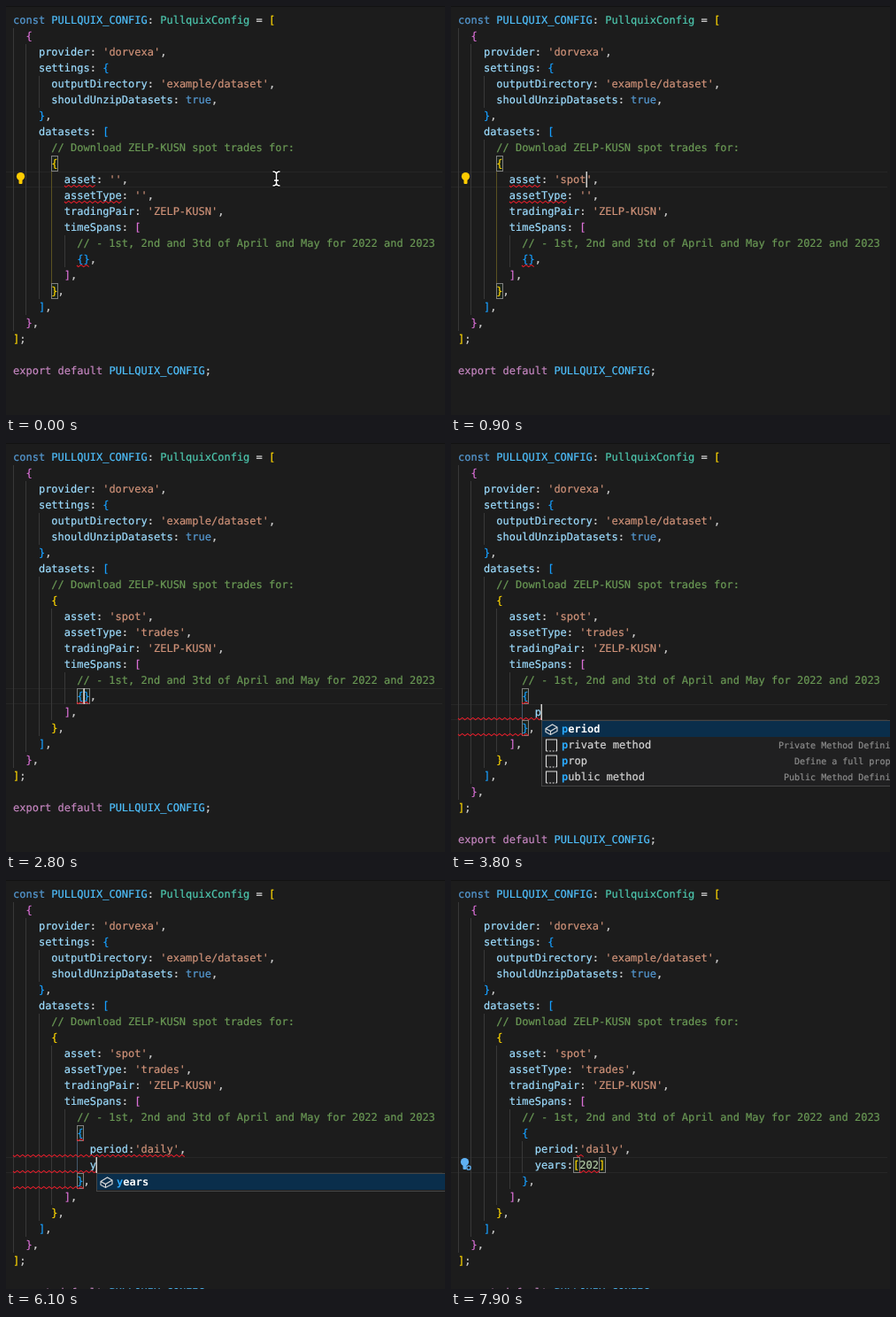
An HTML page that plays this animation: 496x462 px, repeating every 8000 ms.

```html
<!DOCTYPE html>
<html lang="en">
<head>
<meta charset="utf-8">
<title>Editor typing</title>
<style>
  html, body { margin: 0; width: 100%; height: 100%; overflow: hidden; background: #1c1c1c; }
  svg { display: block; }
  text {
    font: 12px "DejaVu Sans Mono", monospace;
    white-space: pre;
    text-rendering: geometricPrecision;
    color: #d4d4d4;
  }
  text, tspan { fill: currentColor; stroke: currentColor; stroke-width: .2px; }
  .hint { font-size: 10px; color: #8c8c8c; }
  .chosen { font-weight: bold; color: #fff; }
  .chosen, .match { stroke: none; }
  .match { font-weight: bold; color: #2aaaff; }
  .icon { fill: none; stroke: #dcdcdc; stroke-width: 1.1; }
</style>
</head>
<body>
<svg id="stage" width="496" height="462" viewBox="0 0 496 462"></svg>
<script>
const LOOP = 8000, CHAR = 7.2246, LINE = 18, LEFT = 8, TOP = 7;
const BRACKETS = ['#ffd700', '#da70d6', '#179fff'];
const colX = c => LEFT + c * CHAR;
const rowY = r => TOP + r * LINE;

const snippets = [
  ['#endregion'], ['#region'],
  ['async arrow function', 'Async Function Expression'],
  ['async function', 'Async Function Statement'],
  ['class', 'Class Definition'], ['ctor'],
  ['dowhile', 'Do-While Statement'],
  ['error', 'Log error to console'], ['for']
].map(([label, hint]) => ({ icon: 'snippet', label, hint }));
const values = (...labels) => labels.map(label => ({ icon: 'value', label }));

const menus = {
  asset: [...values('coin-m', 'spot', 'usd-m'), ...snippets],
  type: [...values('aggTrades', 'klines', 'trades'), ...snippets],
  fields: [
    { icon: 'field', label: 'period', match: 1 },
    { icon: 'snippet', label: 'private method', match: 1, hint: 'Private Method Definition' },
    { icon: 'snippet', label: 'prop', match: 1, hint: 'Define a full property' },
    { icon: 'snippet', label: 'public method', match: 1, hint: 'Public Method Definition' }
  ],
  period: values('daily', 'monthly'),
  years: [{ icon: 'field', label: 'years', match: 1 }]
};

// Each step changes part of the state; "at" moves the caret and restarts its blink.
const daily = "period:'daily',";
const empty = [15, 10, 12], noType = [11, 8, 17];
const steps = [
  [0, { asset: '', type: '', body: null, at: null, menu: null, sel: 0, line: 10, bulb: 'warm',
        mouse: true, wide: false, errs: [[10, 8, 13], noType, empty], pair: [9, 6, 17, 6] }],
  [200, { at: [10, 16] }],
  [300, { menu: 'asset', mouse: false }],
  [600, { sel: 1 }],
  [800, { asset: 'spot', menu: null, at: [10, 20] }],
  [1100, { errs: [noType, empty] }],
  [1400, { at: [11, 20], line: 11 }],
  [1500, { menu: 'type', sel: 0 }],
  [1600, { sel: 1 }],
  [1700, { sel: 2 }],
  [2100, { type: 'trades', menu: null, sel: 0, at: [11, 26] }],
  [2300, { errs: [empty] }],
  [2800, { at: [15, 11], line: 15, bulb: null, pair: [15, 10, 15, 11] }],
  [3000, { body: [''], at: [16, 12], line: 16, errs: [], wide: true, pair: [15, 10, 17, 10] }],
  [3700, { body: ['p'], at: [16, 13], menu: 'fields' }],
  [4000, { body: ['period'], at: [16, 18], menu: null }],
  [4200, { body: ['period:'], at: [16, 19] }],
  [4400, { body: ["period:''"], at: [16, 20] }],
  [4500, { menu: 'period' }],
  [4600, { bulb: 'cool', wide: false, errs: [[16, 12, 18], [16, 19, 21], [17, 10, 11]] }],
  [5200, { body: ["period:'daily'"], at: [16, 25], menu: null }],
  [5400, { at: [16, 26], bulb: null, errs: [], wide: true }],
  [5600, { body: [daily], at: [16, 27] }],
  [5800, { body: [daily, ''], at: [17, 12], line: 17, pair: [15, 10, 18, 10] }],
  [6000, { body: [daily, 'y'], at: [17, 13], menu: 'years' }],
  [6400, { body: [daily, 'years'], at: [17, 17], menu: null }],
  [6700, { body: [daily, 'years:'], at: [17, 18] }],
  [7000, { body: [daily, 'years:[]'], at: [17, 19], pair: [17, 18, 17, 19] }],
  [7100, { body: [daily, 'years:[2]'], at: [17, 20], pair: [17, 18, 17, 20] }],
  [7300, { body: [daily, 'years:[20]'], at: [17, 21], pair: [17, 18, 17, 21] }],
  [7400, { body: [daily, 'years:[202]'], at: [17, 22], pair: [17, 18, 17, 22], bulb: 'cool',
           wide: false, errs: [[16, 18.6, 19.5], [17, 19, 22]] }]
];

function stateAt(t) {
  const s = {};
  let since = 0;
  for (const [time, change] of steps) {
    if (time > t) break;
    Object.assign(s, change);
    if (change.at) since = time;
  }
  s.caretOn = !!s.at && (t - since) % 1000 < 500;
  return s;
}

function codeLines(s) {
  const pad = ' '.repeat(10);
  const span = s.body
    ? [pad + '{', ...s.body.map(l => pad + '  ' + l), pad + '},']
    : [pad + '{},'];
  return [
    'const PULLQUIX_CONFIG: PullquixConfig = [',
    '  {',
    "    provider: 'dorvexa',",
    '    settings: {',
    "      outputDirectory: 'example/dataset',",
    '      shouldUnzipDatasets: true,',
    '    },',
    '    datasets: [',
    '      // Download ZELP-KUSN spot trades for:',
    '      {',
    `        asset: '${s.asset}',`,
    `        assetType: '${s.type}',`,
    "        tradingPair: 'ZELP-KUSN',",
    '        timeSpans: [',
    '          // - 1st, 2nd and 3td of April and May for 2022 and 2023',
    ...span,
    '        ],',
    '      },',
    '    ],',
    '  },',
    '];',
    '',
    'export default PULLQUIX_CONFIG;'
  ];
}

const rules = [
  [/^\/\//, '#6a9955'], [/^'/, '#ce9178'], [/^\d/, '#b5cea8'],
  [/^(const|true)$/, '#569cd6'], [/^(export|default)$/, '#c586c0'],
  [/^[A-Z_]+$/, '#4fc1ff'], [/^[A-Z]/, '#4ec9b0'], [/^[a-z]/, '#9cdcfe']
];
const tokens = /\/\/.*|'[^']*'|\w+|[[\]{}]|[^\w[\]{}']+?/g;

function drawCode(lines) {
  let depth = 0;
  const paint = token => {
    let color = (rules.find(([re]) => re.test(token)) || [])[1] || '#d4d4d4';
    if (/^[[{]$/.test(token)) color = BRACKETS[depth++ % 3];
    if (/^[\]}]$/.test(token)) color = BRACKETS[--depth % 3];
    return token === ' ' ? token : `<tspan color="${color}">${token}</tspan>`;
  };
  return lines.map((l, r) =>
    `<text x="${LEFT}" y="${rowY(r) + 13}">${l.replace(tokens, paint)}</text>`).join('');
}

const rect = (x, y, w, h, fill, more = '') =>
  `<rect x="${x}" y="${y}" width="${w}" height="${h}" fill="${fill}" ${more}/>`;

function drawGuides(lines, [r0, c0, r1]) {
  let out = '';
  lines.forEach((l, r) => {
    const indent = l.search(/\S|$/);
    for (let c = 0; c < indent; c += 2) {
      const active = c === c0 && r > r0 && r < r1;
      const color = !active ? '#383838' : c === 6 ? '#5a5222' : '#43586a';
      out += rect(Math.round(colX(c)), rowY(r), 1, LINE, color);
    }
  });
  return out;
}

function drawPair([r0, c0, r1, c1]) {
  const box = (r, c) => rect(Math.round(colX(c)) + .5, rowY(r) + .5, 7, 17, '#1c241c', 'stroke="#808080"');
  return box(r0, c0) + box(r1, c1);
}

// A wave that rises and falls over 6 px along the foot of the row.
function squiggle([r, from, to]) {
  const x0 = Math.round(colX(from)), end = colX(to), y = rowY(r) + 15;
  let d = `M${x0} ${y + 1}`, low = true;
  for (let x = x0 + 1.75; x <= end + 1; x += 3, low = !low) d += `L${x} ${y + (low ? 2.6 : .4)}`;
  return `<path d="${d}" fill="none" stroke="#e51e2b" stroke-width="1.1"/>`;
}

function errorsOf(s, lines) {
  if (!s.wide) return s.errs;
  const last = 16 + s.body.length;
  return [[15, 10, 11], ...s.body.map((_, i) => [16 + i, 0, lines[16 + i].length]), [last, 0, 11]];
}

function drawBulb(kind, row) {
  const y = rowY(row) + 5.5;
  const color = kind === 'warm' ? '#ffcc00' : '#5fb0f2';
  const x = kind === 'warm' ? 16.5 : 15.5;
  const badge = kind === 'warm' ? '' :
    `<circle cx="20" cy="${y + 6.5}" r="2.2" fill="#1c1c1c" stroke="${color}" stroke-width="1.3"/>`;
  return `<circle cx="${x}" cy="${y}" r="4.6" fill="${color}"/>` +
    rect(x - 2, y + 3, 4, 5.5, color, 'rx="1"') + badge;
}

const icons = {
  value: '<rect x="-6.5" y="-4.5" width="13" height="9" rx="1"/><path d="M-4 -1.5H4M-4 1.5H4"/>',
  snippet: '<path d="M-6 6.5V-6.5H6V6.5"/><path d="M-6 6.5H6" stroke-dasharray="2 1.6"/>',
  field: '<path d="M-6.5 -1L1 -5.5L6.5 -2.5V2L-1 6L-6.5 3ZM-6.5 -1L-1 2L6.5 -2.5M-1 2V6"/>'
};

function drawMenu(items, sel, [row, col]) {
  const x = Math.ceil(colX(col)) + .5, y = rowY(row + 1) + .5;
  let out = rect(x, y, 430, items.length * LINE + 2, '#202021', 'stroke="#454545"');
  items.forEach(({ icon, label, match = 0, hint }, i) => {
    const top = y + .5 + i * LINE, on = i === sel;
    if (on) out += rect(x + .5, top, 430, LINE, '#0a2e4b');
    out += `<g class="icon" transform="translate(${x + 11} ${top + 9.5})">${icons[icon]}</g>`;
    out += `<text class="${on ? 'chosen' : ''}" x="${x + 22.5}" y="${top + 13}">` +
      `<tspan class="match">${label.slice(0, match)}</tspan>${label.slice(match)}</text>`;
    if (hint) out += `<text class="hint" x="${x + 418}" y="${top + 12.5}" text-anchor="end">${hint}</text>`;
  });
  return out;
}

function drawMouse(x, y) {
  const d = `M${x - 4} ${y - 8}Q${x} ${y - 8} ${x} ${y - 5}Q${x} ${y - 8} ${x + 4} ${y - 8}` +
    `M${x} ${y - 6}V${y + 6}M${x - 4} ${y + 8}Q${x} ${y + 8} ${x} ${y + 5}Q${x} ${y + 8} ${x + 4} ${y + 8}` +
    `M${x - 2.5} ${y + 2}H${x + 2.5}`;
  return `<g fill="none"><path d="${d}" stroke="#000" stroke-width="3.4"/>` +
    `<path d="${d}" stroke="#fff" stroke-width="1.5"/></g>`;
}

function draw(s) {
  const lines = codeLines(s);
  const y = rowY(s.line);
  return rect(0, 0, 496, 462, '#1c1c1c') + rect(0, 0, 496, 1, '#121212') +
    rect(0, y, 493, 1, '#262626') + rect(0, y + LINE - 1, 493, 1, '#262626') +
    drawGuides(lines, s.pair) + drawPair(s.pair) + drawCode(lines) +
    errorsOf(s, lines).map(squiggle).join('') +
    (s.bulb ? drawBulb(s.bulb, s.line) : '') +
    (s.caretOn ? rect(Math.ceil(colX(s.at[1])) - .5, rowY(s.at[0]), 1.5, LINE, '#d0d0ce') : '') +
    (s.menu ? drawMenu(menus[s.menu], s.sel, s.at) : '') +
    (s.mouse ? drawMouse(305.5, 195) : '');
}

const stage = document.getElementById('stage');
const start = performance.now();
let shown = '';

function tick() {
  const t = Math.max(0, performance.now() - start) % LOOP;
  const s = stateAt(t);
  const key = JSON.stringify(s);
  if (key !== shown) {
    stage.innerHTML = draw(s);
    shown = key;
  }
  requestAnimationFrame(tick);
}
tick();
</script>
</body>
</html>
```
